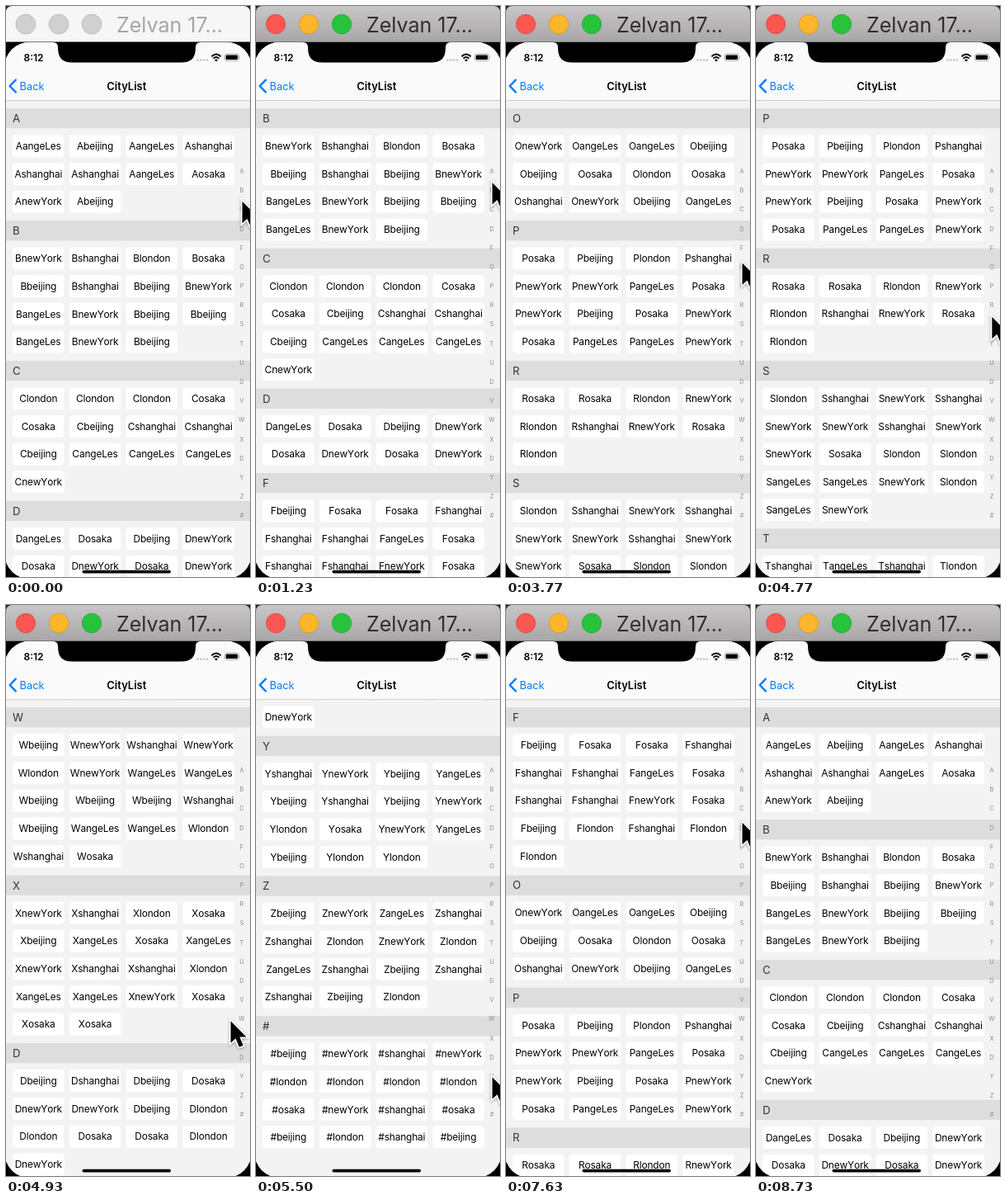
An HTML page for the animation above (8.76 s loop, 296 by 692 pixels).

```html
<!DOCTYPE html>
<html lang="en">
<head>
<meta charset="utf-8">
<title>CityList</title>
<style>
  html, body { margin: 0; width: 100%; height: 100%; overflow: hidden; background: #000; }
  svg { display: block; width: 296px; height: 692px; font-family: Inter, Roboto, sans-serif; }
  .cell { font-size: 11.9px; letter-spacing: -.15px; font-kerning: none; text-anchor: middle; fill: #000; }
  .head { font-size: 13.2px; fill: #333; }
  .index { font-size: 7.4px; text-anchor: middle; fill: #8b8b90; }
  #cursor { filter: drop-shadow(0 1.5px 1.5px rgba(0, 0, 0, .35)); }
</style>
</head>
<body>
<svg viewBox="0 0 296 692" xmlns="http://www.w3.org/2000/svg">
  <defs>
    <linearGradient id="bar" x2="0" y2="1">
      <stop offset="0" stop-color="#c8c6c7"/>
      <stop offset="1" stop-color="#a8a6a7"/>
    </linearGradient>
    <clipPath id="screen"><rect x="-1.7" y="44" width="299.4" height="650" rx="30"/></clipPath>
  </defs>
  <rect width="296" height="692" fill="#000"/>
  <g clip-path="url(#screen)">
    <rect y="44" width="296" height="648" fill="#f3f3f3"/>
    <g id="list"></g>
    <g id="letters"></g>
    <rect y="44" width="296" height="70" fill="#fafafa"/>
    <rect y="114" width="296" height=".7" fill="#bdbdbf"/>
    <path d="M57 44Q63 44 63 50C63 63 68 68.5 81 68.5H212C225 68.5 230 63 230 50Q230 44 236 44Z"/>
    <text x="21.5" y="66.6" font-size="12" font-weight="600">8:12</text>
    <g fill="#c6c6c8">
      <circle cx="232.5" cy="65.6" r="1.3"/><circle cx="236.3" cy="65.6" r="1.3"/>
      <circle cx="240.1" cy="65.6" r="1.3"/><circle cx="243.9" cy="65.6" r="1.3"/>
    </g>
    <g fill="none" stroke="#000" stroke-width="1.9">
      <path d="M249.4 61.2Q255 55.8 260.6 61.2"/>
      <path d="M251.5 63.6Q255 60.3 258.5 63.6"/>
    </g>
    <path d="M253 65.2Q255 63.6 257 65.2L255 67.4Z"/>
    <rect x="265.4" y="58.2" width="17" height="8.2" rx="2.4" fill="none" stroke="#999" stroke-width=".8"/>
    <rect x="266.7" y="59.5" width="14.4" height="5.6" rx="1.3"/>
    <path d="M283.4 60.8Q285 62.3 283.4 63.8Z" fill="#999"/>
    <path d="M11.8 89.6L4.6 97L11.8 104.4" fill="none" stroke="#007aff" stroke-width="2.4" stroke-linecap="round" stroke-linejoin="round"/>
    <text x="16.6" y="101.6" font-size="12.8" fill="#007aff">Back</text>
    <text x="146.3" y="101.6" font-size="13" font-weight="600" text-anchor="middle">CityList</text>
    <rect x="92.5" y="683.7" width="107.5" height="3.8" rx="1.9"/>
  </g>
  <rect width="296" height="12" fill="#24242e"/>
  <path id="titlebar" d="M0 43.5V8Q0 0 8 0H288Q296 0 296 8V43.5Z"/>
  <rect y="43" width="296" height="1" fill="#777"/>
  <g id="lights"></g>
  <text id="title" x="134" y="32" font-size="25">Zelvan 17...</text>
  <path id="cursor" d="M.6 1V27.5L6.6 22L11 32.5L15.8 30.5L11.4 20.2H19.6Z" stroke="#fff" stroke-width="3.6" paint-order="stroke"/>
</svg>
<script>
const LOOP = 8760, TOP = 124, ROW = 33.7;
const ACTIVE_AT = 300, DRAG_AT = 1000, LAG = 90, LEAVE_AT = 8000, GONE_AT = 8725;
const $ = id => document.getElementById(id);
const cities = { a: 'angeLes', b: 'beijing', s: 'shanghai', l: 'london', o: 'osaka', n: 'newYork' };

let seed = 7;
function random() {
  seed = seed * 16807 % 2147483647;
  return seed / 2147483647;
}
const randomCodes = () =>
  Array.from({ length: 13 + Math.floor(random() * 6) }, () => 'abslon'[Math.floor(random() * 6)]).join('');

// section letter, then one letter per city, four to a row; a bare letter gets random cities
const sections = [
  'A abasssaonb', 'B nslobsbnanbbanb', 'C llloobssbaaan', 'D aobnonon', 'F boosssaossnoblsll',
  'O naabbolosnba', 'P oblsnnaonbonoaan', 'R oolnlsnol', 'S lsnsnnsnnollaanlan',
  'T saslannooollnssnla', 'U oloabnsllbolnaan', 'D', 'V', 'W bnsnlnaabbbsbaalso',
  'X nslobaoansslaanooo', 'D bsbonnbllooln', 'Y', 'Z', '#'
].map(s => {
  const [name, codes = randomCodes()] = s.split(' ');
  return { name, codes };
});

function add(parent, tag, attrs, text) {
  const el = document.createElementNS('http://www.w3.org/2000/svg', tag);
  for (const k in attrs) el.setAttribute(k, attrs[k]);
  if (text) el.textContent = text;
  parent.appendChild(el);
  return el;
}

const letterY = i => 200.3 + i * 23.18;

let y = TOP;
sections.forEach((s, i) => {
  s.y = y;
  add($('list'), 'rect', { x: 0, y, width: 296, height: 24.3, fill: '#dddddd' });
  add($('list'), 'text', { class: 'head', x: 8, y: y + 17 }, s.name);
  [...s.codes].forEach((c, k) => {
    const cx = 39.3 + (k % 4) * 68.75, cy = y + 45.8 + Math.floor(k / 4) * ROW;
    add($('list'), 'rect', { x: cx - 31.3, y: cy - 13.5, width: 62.6, height: 27, rx: 4, fill: '#fff' });
    add($('list'), 'text', { class: 'cell', x: cx, y: cy + 4.2 }, s.name + cities[c]);
  });
  y += 35 + ROW * Math.ceil(s.codes.length / 4);
  add($('letters'), 'text', { class: 'index', x: 286, y: letterY(i) + 2.7 }, s.name);
});
const maxScroll = y - 668;

const lights = ['#fc5650', '#fdb52b', '#27c33b'].map((color, i) => ({
  color, el: add($('lights'), 'circle', { cx: 24 + i * 40, cy: 22, r: 11.9 })
}));

// time and pointer position along the index, counted in letters
const drag = [
  [0, 1.5], [450, 13.4], [900, .5], [1230, .55], [2640, 2.3], [2730, 3.1], [4680, 6.2],
  [4770, 7.5], [4840, 12.7], [4930, 13.05], [5200, 18], [5480, 16], [5830, 16],
  [6800, 8], [6870, .95], [7200, .6], [7500, 4], [7900, 0]
];

const mix = (a, b, p) => a + (b - a) * p;

function indexAt(t) {
  const i = drag.findIndex(k => k[0] > t);
  if (i < 0) return drag[drag.length - 1][1];
  const [t0, a] = drag[i - 1], [t1, b] = drag[i];
  return mix(a, b, (t - t0) / (t1 - t0));
}

function draw(t) {
  const active = t >= ACTIVE_AT;
  $('titlebar').setAttribute('fill', active ? 'url(#bar)' : '#f6f6f6');
  $('title').setAttribute('fill', active ? '#302e2f' : '#a6a6a6');
  lights.forEach(({ el, color }) => {
    el.setAttribute('fill', active ? color : '#d0d0d0');
    el.setAttribute('stroke', active ? 'rgba(0,0,0,.12)' : '#bebebe');
  });

  // the list jumps to the touched letter a moment later
  const section = t < DRAG_AT ? 0 : Math.round(indexAt(t - LAG));
  const scroll = Math.min(sections[section].y - TOP, maxScroll);
  $('list').setAttribute('transform', `translate(0 ${-scroll})`);

  // the pointer swerves left once, and finally leaves to the top left
  const swerve = 14 * Math.exp(-(((t - 4930) / 80) ** 2));
  const leave = Math.max(0, (t - LEAVE_AT) / (GONE_AT - LEAVE_AT));
  const px = mix(286 - swerve, 8, leave), py = mix(letterY(indexAt(t)), 12, leave);
  $('cursor').setAttribute('transform', `translate(${px} ${py})`);
  $('cursor').setAttribute('visibility', t < GONE_AT ? 'visible' : 'hidden');
}

const start = performance.now();
function tick(now) {
  draw(Math.max(0, now - start) % LOOP);
  requestAnimationFrame(tick);
}
draw(0);
requestAnimationFrame(tick);
</script>
</body>
</html>
```
